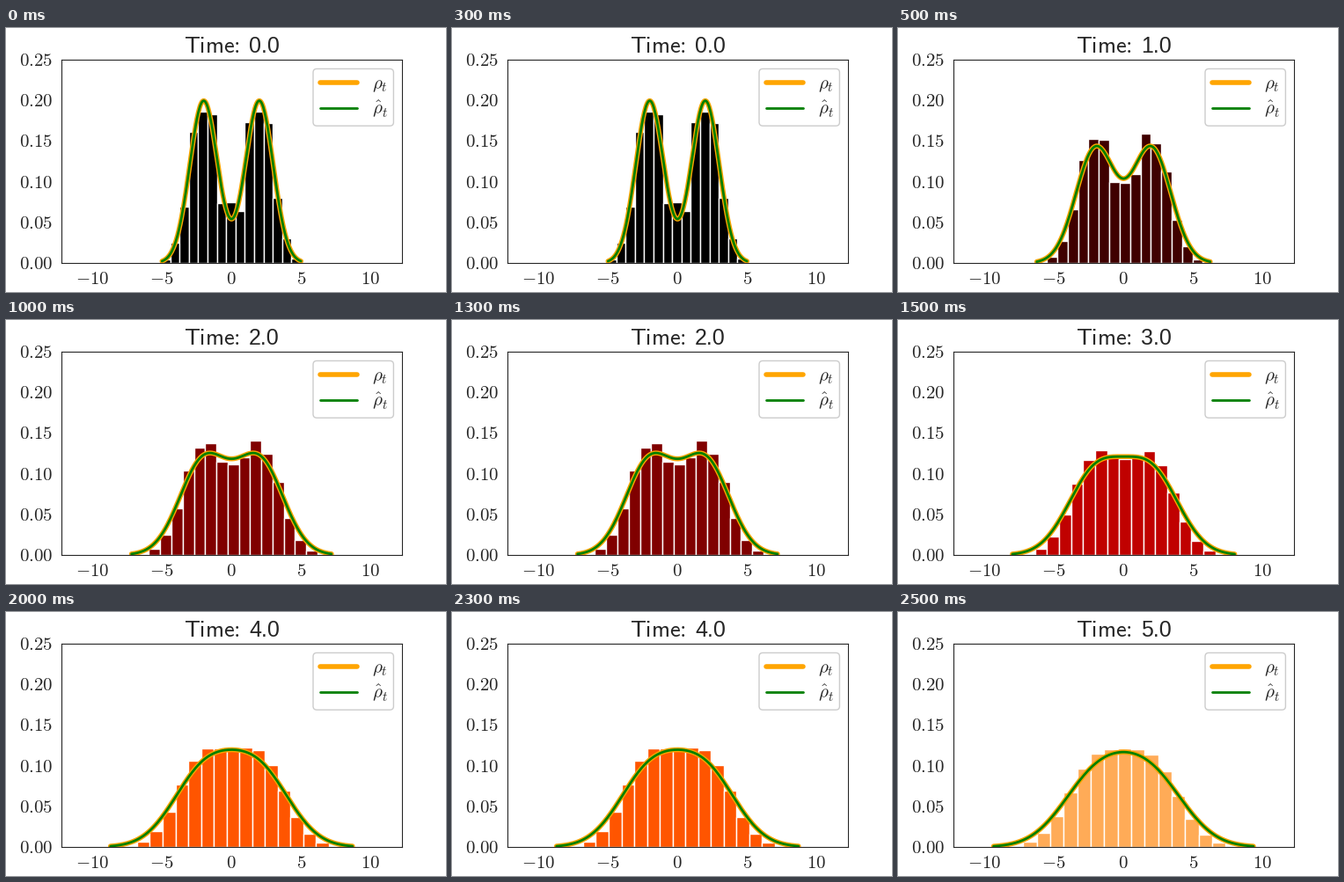
Recreate the animation shown at these times as a matplotlib script. Size 500 by 300 pixels, loop 3000 ms.

```python
import numpy as np
import matplotlib.pyplot as plt
from matplotlib.animation import FuncAnimation
from matplotlib.lines import Line2D
from matplotlib.patches import FancyBboxPatch
from matplotlib.transforms import IdentityTransform

W, H, DPI = 500, 300, 100
STEPS, BINS = 6, 15
INK = "0.15"
PIXELS = IdentityTransform()

plt.rcParams.update({
    "font.family": "Liberation Serif",
    "mathtext.fontset": "cm",
    "text.color": INK,
    "axes.edgecolor": INK,
    "xtick.color": INK,
    "ytick.color": INK,
    "lines.solid_capstyle": "round",
})


def density(x, var):
    """Equal mixture of two normal laws centred at -2 and 2."""
    bumps = np.exp(-(x - 2) ** 2 / (2 * var)) + np.exp(-(x + 2) ** 2 / (2 * var))
    return bumps / (2 * np.sqrt(2 * np.pi * var))


def histogram(t):
    """Bin edges and heights; the samples spread more slowly than the law."""
    low = -5.08 - 0.428 * t
    high = 4.98 + 0.726 * t ** 0.737
    edges = np.linspace(low, high, BINS + 1)
    heights = density((edges[:-1] + edges[1:]) / 2, 1 + 0.6 * t)
    # Sampling unevenness, strongest in the middle and fading with time
    i = np.arange(BINS)
    ripple = -(-1.0) ** i * np.sin(np.pi * (i + 0.5) / BINS) ** 2
    return edges, heights + 0.02 * np.exp(-t) * ripple


def put_text(x, y, text, size, **style):
    """Place text by its left baseline point, measured from the top left."""
    return fig.text(x, H - y, text, fontsize=size, va="baseline",
                    transform=PIXELS, **style)


fig, ax = plt.subplots(figsize=(W / DPI, H / DPI), dpi=DPI)
bars = ax.bar(range(BINS), [0] * BINS, align="edge", edgecolor="white", linewidth=1)
exact, = ax.plot([], [], color="orange", lw=4)
estimate, = ax.plot([], [], color="green", lw=2)

ax.set_xlim(-12.265, 12.265)
ax.set_ylim(0, 0.25)
xticks = range(-10, 11, 5)
yticks = np.linspace(0, 0.25, 6)
ax.set_xticks(xticks, [f"${x}$" for x in xticks])
ax.set_yticks(yticks, [f"${y:.2f}$" for y in yticks])
ax.tick_params(left=False, bottom=False, labelsize=15)
ax.tick_params(axis="y", pad=3)

put_text(201.7, 27.7, r"$\mathsf{Time\hspace{-0.2}:}$", 19)
clock = put_text(276, 27.7, "", 18, family="Liberation Sans")


def draw_legend():
    fig.add_artist(FancyBboxPatch(
        (349, H - 111.2), 91.4, 64.8, boxstyle="round,pad=0,rounding_size=4.17",
        fc="white", ec="0.8", lw=1, transform=PIXELS))
    rows = [(62, "orange", 4, r"$\rho_t$"),
            (91.2, "green", 2, r"$\hat{\rho}_t$")]
    for y, color, width, label in rows:
        fig.add_artist(Line2D([357, 398.7], [H - y] * 2, color=color, lw=width,
                              transform=PIXELS))
        put_text(415.7, y + 7, label, 15)


def update(t):
    edges, heights = histogram(t)
    color = plt.cm.gist_heat(t / STEPS)
    for bar, left, width, height in zip(bars, edges, np.diff(edges), heights):
        bar.set_bounds(left, 0, width, height)
        bar.set_facecolor(color)

    var = 1 + t
    reach = 2 + 3 * np.sqrt(var)
    x = np.linspace(-reach, reach, 200)
    for line in (exact, estimate):
        line.set_data(x, density(x, var))
    clock.set_text(f"{t:.1f}")
    return [*bars, exact, estimate, clock]


draw_legend()
anim = FuncAnimation(fig, update, frames=STEPS, interval=500, repeat=True,
                     repeat_delay=0, blit=False)
plt.show()
```
